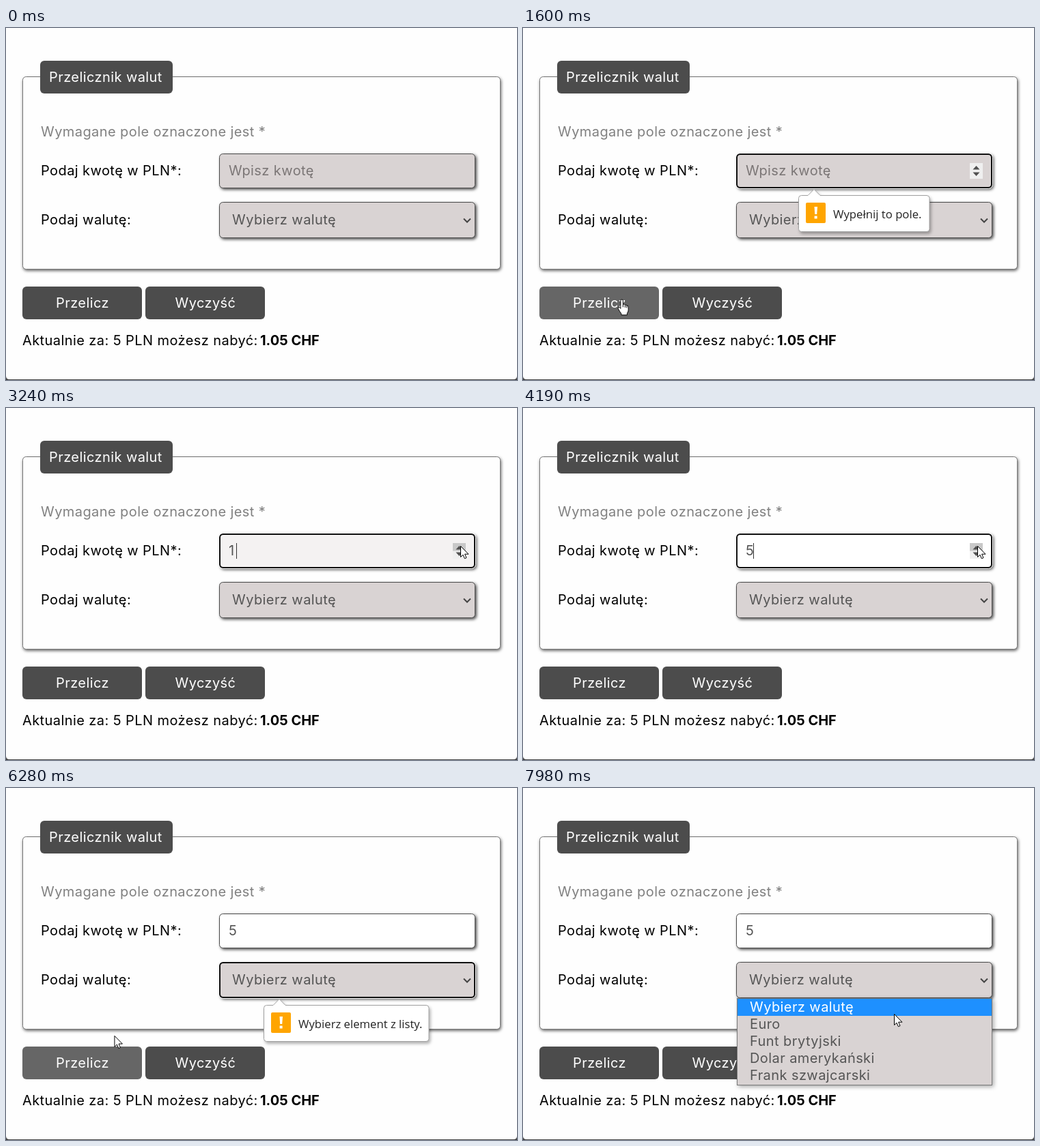
An HTML page for the animation above (8 s loop, 748 by 516 pixels).

```html
<!DOCTYPE html>
<html lang="pl">
<head>
<meta charset="utf-8">
<title>Przelicznik walut</title>
<style>
html, body { margin: 0; width: 100%; height: 100%; overflow: hidden; background: #444; }
svg { display: block; width: 748px; height: 516px; }
text { font: 20px Inter, "Open Sans", sans-serif; letter-spacing: .42px; white-space: pre; }
.btn { fill: #4c4c4c; }
.light { fill: #fff; }
.mid { text-anchor: middle; }
.grey { fill: #808080; }
.soft { fill: #555; }
.bold { font-weight: 700; letter-spacing: 0; }
.set { fill: #fefefe; stroke: #777; filter: drop-shadow(1.5px 2px 2px rgba(0,0,0,.6)); }
.box { fill: #d9d3d3; stroke: #4c4c4c; filter: drop-shadow(2px 2px 2px rgba(0,0,0,.7)); }
.ring rect { fill: none; stroke: #101010; stroke-width: 2; }
.ring rect + rect { stroke: #fff; stroke-width: 1; }
.tip text { font: 16.7px "Open Sans", "Noto Sans", sans-serif; letter-spacing: 0; fill: #222; }
.tip .bubble { fill: #fff; stroke: #a0a0a0; filter: drop-shadow(2px 3px 2px rgba(0,0,0,.3)); }
#list .panel { fill: #d9d3d3; stroke: #777; filter: drop-shadow(2px 2px 3px rgba(0,0,0,.35)); }
.pointer { fill: #fff; stroke: #000; stroke-linejoin: round; }
</style>
</head>
<body>
<svg viewBox="0 0 748 516">
  <path fill="#fefefe" d="M0 0H748V510Q748 515 743 515H5Q0 515 0 510Z"/>
  <rect class="set" x="24.500" y="71.500" width="699" height="282" rx="5"/>
  <rect class="btn" x="50" y="48" width="194" height="48" rx="6"/>
  <text class="light" x="63" y="79">Przelicznik walut</text>
  <text class="grey" x="51" y="159">Wymagane pole oznaczone jest *</text>
  <text x="51" y="216">Podaj kwotę w PLN*:</text>
  <text x="51" y="288">Podaj walutę:</text>

  <rect id="field" class="box" x="312.500" y="184.500" width="374" height="50" rx="5"/>
  <g id="fieldRing" class="ring">
    <rect x="313" y="185" width="373" height="49" rx="5"/>
    <rect x="311.500" y="183.500" width="376" height="52" rx="6"/>
  </g>
  <text id="value" x="326" y="216"></text>
  <path id="caret" stroke="#333" d="M0 198V221"/>
  <g id="spinner">
    <rect x="654" y="198" width="19" height="23" fill="#efefef"/>
    <rect id="spinUp" x="654" y="198" width="19" height="11.500" fill="#c8c8c8"/>
    <path fill="#505050" d="M658.500 207.500L663.500 202L668.500 207.500ZM658.500 211.500L663.500 217L668.500 211.500Z"/>
  </g>

  <rect class="box" x="312.500" y="255.500" width="374" height="52" rx="5"/>
  <g id="selectRing" class="ring">
    <rect x="313" y="256" width="373" height="51" rx="5"/>
    <rect x="311.500" y="254.500" width="376" height="54" rx="6"/>
  </g>
  <text class="soft" x="331" y="288">Wybierz walutę</text>
  <path fill="none" stroke="#444" stroke-width="2" d="M670 279.500L675 284.500L680 279.500"/>

  <rect id="submit" x="24" y="379" width="175" height="48" rx="6"/>
  <rect class="btn" x="204" y="379" width="175" height="48" rx="6"/>
  <text class="light mid" x="112" y="410">Przelicz</text>
  <text class="light mid" x="292" y="410">Wyczyść</text>
  <text x="24" y="465">Aktualnie za: 5 PLN możesz nabyć:</text>
  <text class="bold" x="372" y="465">1.05 CHF</text>

  <g id="tipField" class="tip"></g>
  <g id="tipSelect" class="tip"></g>
  <g id="list">
    <rect class="panel" x="313.500" y="308.500" width="373" height="127"/>
    <rect x="314" y="309" width="372" height="25" fill="#1e90ff"/>
  </g>
  <g id="cursor">
    <path id="arrow" class="pointer" d="M.5 .5V16.500L4 13.200L6.400 18.700L9 17.600L6.600 12.200H12Z"/>
    <g id="hand">
      <path class="pointer" d="M-2 13V1.500A1.700 1.700 0 0 1 1.500 1.500V7Q3.500 5.800 4.500 7.800Q6.500 6.800 7 8.800Q9.300 8.300 9.300 10.500V15Q9.300 18 7.500 20V22.500H-1V20.500Q-3 18 -5.500 13.500Q-6.300 11 -4 11Q-3 11.500 -2 13Z"/>
      <path stroke="#000" d="M1.500 7V11M4.500 8V11.500M7 9V12"/>
    </g>
    <path id="beam" fill="none" stroke="#222" d="M-3 -8H-1L0 -7L1 -8H3M0 -7V7M-3 8H-1L0 7L1 8H3"/>
  </g>
</svg>
<script>
const LOOP = 8000;
const $ = id => document.getElementById(id);
const show = (id, on) => $(id).style.display = on ? '' : 'none';
const ramp = (t, a, b) => Math.min(1, Math.max(0, (t - a) / (b - a)));
const pulse = (t, a, b, c, d) => ramp(t, a, b) - ramp(t, c, d);
const within = (t, a, b) => t >= a && t < b;

// Validation bubble, drawn relative to the peak of its arrow
const bubble = (width, label) => `
  <path class="bubble" d="M-18.500 8.500H-9L0 -.5L9 8.500H${width - 27}q4 0 4 4v45q0 4 -4 4H-18.500q-4 0 -4 -4v-45q0 -4 4 -4Z"/>
  <rect x="-12" y="19" width="29" height="30" rx="2" fill="#ffa500"/>
  <path fill="#fff" d="M.5 25H5L4.200 36H1.200ZM.6 38.500h4v4h-4Z"/>
  <text x="28" y="42">${label}</text>`;
$('tipField').innerHTML = bubble(192, 'Wypełnij to pole.');
$('tipSelect').innerHTML = bubble(242, 'Wybierz element z listy.');

const options = ['Wybierz walutę', 'Euro', 'Funt brytyjski', 'Dolar amerykański', 'Frank szwajcarski'];
$('list').innerHTML += options.map((name, i) =>
  `<text x="332" y="${328 + 25 * i}" class="${i ? 'soft' : 'light'}">${name}</text>`).join('');

// Pointer keys: time, x, y
const path = [
  [130, 567, 510], [440, 265, 445], [620, 143, 399], [1570, 143, 399],
  [2430, 656, 203], [2830, 665, 202], [4270, 665, 202], [5110, 201, 378],
  [5530, 93, 388], [5670, 29, 399], [5930, 70, 400], [5960, 70, 400],
  [6280, 158, 363], [6770, 635, 266], [7000, 687, 286], [7300, 674, 280],
  [7590, 674, 280], [7980, 543, 331]
];

// Monotone cubic interpolation through the keys
function along(t, axis) {
  const last = path.length - 1;
  if (t <= path[0][0]) return path[0][axis];
  if (t >= path[last][0]) return path[last][axis];
  const i = path.findIndex(key => key[0] > t) - 1;
  const slope = k => k < 0 || k >= last ? 0 :
    (path[k + 1][axis] - path[k][axis]) / (path[k + 1][0] - path[k][0]);
  const tangent = k => {
    const a = slope(k - 1), b = slope(k);
    return a * b <= 0 ? 0 : 2 * a * b / (a + b);
  };
  const [p, q] = [path[i], path[i + 1]];
  const span = q[0] - p[0], u = (t - p[0]) / span, v = 1 - u;
  return v * v * (1 + 2 * u) * p[axis] + u * u * (3 - 2 * u) * q[axis]
    + span * u * v * (v * tangent(i) - u * tangent(i + 1));
}

function placeTip(id, x, y, grow, alpha) {
  show(id, alpha > 0);
  $(id).setAttribute('opacity', alpha);
  $(id).setAttribute('transform', `translate(${x} ${y}) scale(${.94 + .06 * grow})`);
}

const mix = (a, b, k) => Math.round(a + (b - a) * k);
const clicks = [3030, 3310, 3590, 3910, 4150];

function draw(t) {
  const x = along(t, 1), y = along(t, 2);
  const inField = within(x, 312, 687) && within(y, 184, 235);
  const onButton = within(x, 24, 199) && within(y, 379, 427);
  const onSpinner = inField && x > 659;

  // Amount field
  const focused = within(t, 930, 5720);
  const count = clicks.filter(c => t >= c).length;
  const white = ramp(t, 3030, 3330);
  $('field').style.fill = `rgb(${mix(217, 255, white)},${mix(211, 255, white)},${mix(211, 255, white)})`;
  $('value').textContent = count || 'Wpisz kwotę';
  $('value').setAttribute('fill', count ? '#555' : '#7b7676');
  show('fieldRing', focused);
  show('spinner', focused || inField);
  show('spinUp', onSpinner);
  const blinkStart = count ? clicks[count - 1] : 950;
  show('caret', focused && (t - blinkStart + 1000) % 1000 < 500);
  $('caret').setAttribute('transform', `translate(${count ? 337.5 : 326.5})`);

  // Button, currency list and bubbles
  const hover = pulse(t, 500, 620, 1680, 1850) + pulse(t, 5150, 5300, 6290, 6450);
  const press = pulse(t, 770, 840, 900, 1000) + pulse(t, 5600, 5650, 5700, 5800);
  const shade = 76 + 26 * hover + 12 * press;
  $('submit').style.fill = `rgb(${shade},${shade},${shade})`;
  show('selectRing', within(t, 5720, 7190));
  placeTip('tipField', 426, 237, ramp(t, 930, 1130), pulse(t, 930, 1130, 3030, 3200));
  placeTip('tipSelect', 400, 310, ramp(t, 5720, 5920), pulse(t, 5720, 5920, 7050, 7190));
  show('list', t >= 7190);
  $('list').setAttribute('opacity', ramp(t, 7150, 7330));

  // Pointer
  show('cursor', t >= 130);
  $('cursor').setAttribute('transform', `translate(${x} ${y})`);
  show('hand', onButton);
  show('beam', inField && !onSpinner);
  show('arrow', !onButton && (!inField || onSpinner));
}

const start = performance.now();
function tick() {
  draw((performance.now() - start) % LOOP);
  requestAnimationFrame(tick);
}
tick();
</script>
</body>
</html>
```
